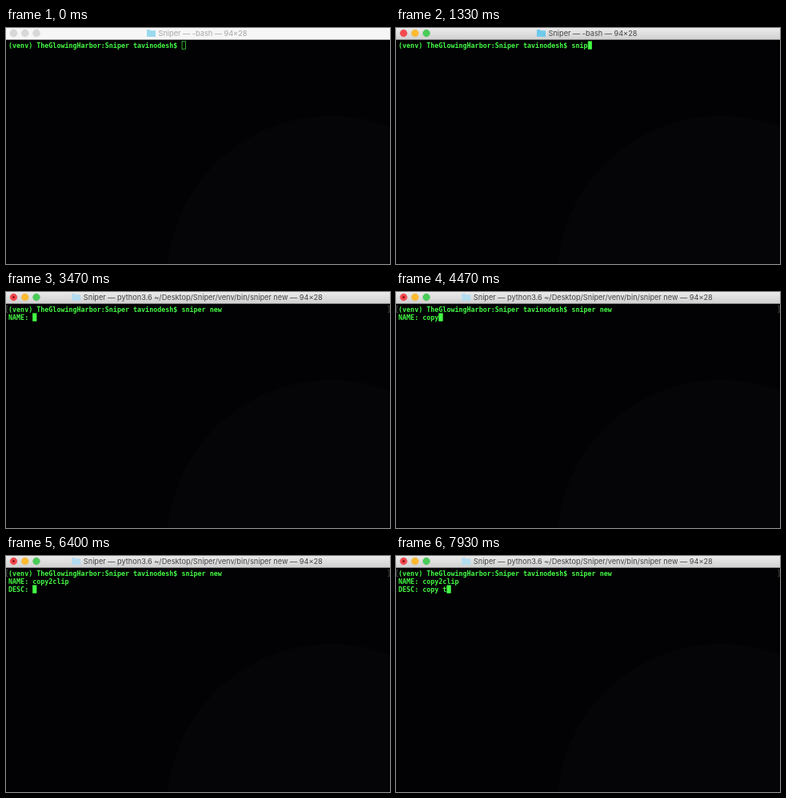
An HTML page for the animation above (8000 ms loop, 480 px wide and 296 px high).

```html
<!DOCTYPE html>
<html lang="en">
<head>
<meta charset="utf-8">
<title>Terminal session</title>
<style>
  html, body { margin: 0; width: 100%; height: 100%; overflow: hidden; background: #020103; }
  svg { display: block; width: 100%; height: 100%; }
  .title { font: 9.18px Inter, "Open Sans", sans-serif; text-anchor: middle; }
  .term { font: bold 8.37px "DejaVu Sans Mono", monospace; fill: #44fb45; white-space: pre; }
</style>
</head>
<body>
<svg viewBox="0 0 480 296" preserveAspectRatio="none">
  <defs>
    <linearGradient id="chrome" x1="0" y1="0" x2="0" y2="1">
      <stop offset="0" stop-color="#ebebeb"/>
      <stop offset="1" stop-color="#d0d0d0"/>
    </linearGradient>
  </defs>
  <rect width="480" height="296" fill="#020103"/>
  <circle cx="407" cy="316" r="206" fill="#050406"/>

  <rect id="bar" width="480" height="14.5"/>
  <rect id="edge" y="14" width="480" height=".6"/>
  <g id="lights" stroke-width=".4">
    <circle cx="9.5" cy="6.5" r="4.4"/>
    <circle cx="23.8" cy="6.5" r="4.4"/>
    <circle cx="38" cy="6.5" r="4.4"/>
  </g>
  <circle id="busy" cx="9.5" cy="6.5" r="1.5" fill="#8c1018"/>
  <path id="folder" d="M0 1.2q0-.7.7-.7h3l1.1 1.2h5.5q.7 0 .7.7v6.4q0 .7-.7.7H.7q-.7 0-.7-.7z"/>
  <text id="title" class="title" y="10.2"></text>

  <path id="marks" d="M2.4 17.5H.8v8h1.6M477.4 17.5h1.6v8h-1.6" fill="none" stroke="#5d705d" stroke-width=".7"/>
  <g id="rows" class="term">
    <text x="3" y="24.8"></text>
    <text x="3" y="34.8"></text>
    <text x="3" y="44.8"></text>
  </g>
  <rect id="cursor" stroke="#44fb45" stroke-width=".7"/>
</svg>
<script>
const $ = id => document.getElementById(id);
const LOOP = 8000, FOCUS = 400, RUN = 2000, ASK_NAME = 2800, ASK_DESC = 5930;
const CELL = 5.04, LEFT = 3, ROW = 10;
const PROMPT = "(venv) TheGlowingHarbor:Sniper tavinodesh$ ";
const SHELL_TITLE = "Sniper — -bash — 94×28";
const RUN_TITLE = "Sniper — python3.6 ~/Desktop/Sniper/venv/bin/sniper new — 94×28";

// Each entry holds the text and the time of every key press.
const command = ["sniper new", [930, 1060, 1200, 1270, 1370, 1430, 1480, 1540, 1600, 1660]];
const name = ["copy2clip", [3930, 4070, 4200, 4330, 4600, 4870, 5070, 5200, 5400]];
const desc = ["copy t", [6730, 6870, 7000, 7130, 7400, 7600]];

const typed = ([text, keys], t) => text.slice(0, keys.filter(k => k <= t).length);

function set(el, attrs) {
  for (const key in attrs) el.setAttribute(key, attrs[key]);
}

function drawChrome(focused, running) {
  set($("bar"), { fill: focused ? "url(#chrome)" : "#f6f6f6" });
  set($("edge"), { fill: focused ? "#a9a9a9" : "#d4d4d4" });
  const fills = focused ? ["#f54a50", "#fdbb30", "#4acb58"] : Array(3).fill("#d8d8d8");
  const rims = focused ? ["#e0444a", "#e6a82c", "#40b94c"] : Array(3).fill("#c4c4c4");
  [...$("lights").children].forEach((dot, i) => set(dot, { fill: fills[i], stroke: rims[i] }));
  set($("busy"), { visibility: running ? "visible" : "hidden" });
  set($("folder"), {
    transform: `translate(${running ? 82.2 : 176} 1.6)`,
    fill: running ? "#b4dcef" : focused ? "#6fc9ea" : "#9bd9ee"
  });
  set($("title"), { x: running ? 246.3 : 246, fill: focused ? "#454545" : "#a6a6a6" });
  $("title").textContent = running ? RUN_TITLE : SHELL_TITLE;
  set($("marks"), { visibility: running ? "visible" : "hidden" });
}

function drawScreen(t, focused) {
  const lines = [PROMPT + typed(command, t)];
  if (t >= RUN) lines.push(t >= ASK_NAME ? "NAME: " + typed(name, t) : "");
  if (t >= ASK_DESC) lines.push("DESC: " + typed(desc, t));
  [...$("rows").children].forEach((row, i) => row.textContent = lines[i] || "");
  const last = lines.length - 1;
  set($("cursor"), {
    x: LEFT + lines[last].length * CELL + .3,
    y: 16.9 + last * ROW,
    width: 4.5,
    height: 9.4,
    fill: focused ? "#44fb45" : "none"
  });
}

function render(t) {
  const focused = t >= FOCUS;
  drawChrome(focused, t >= RUN);
  drawScreen(t, focused);
}

const start = performance.now();
function tick() {
  render((performance.now() - start) % LOOP);
  requestAnimationFrame(tick);
}
tick();
</script>
</body>
</html>
```
